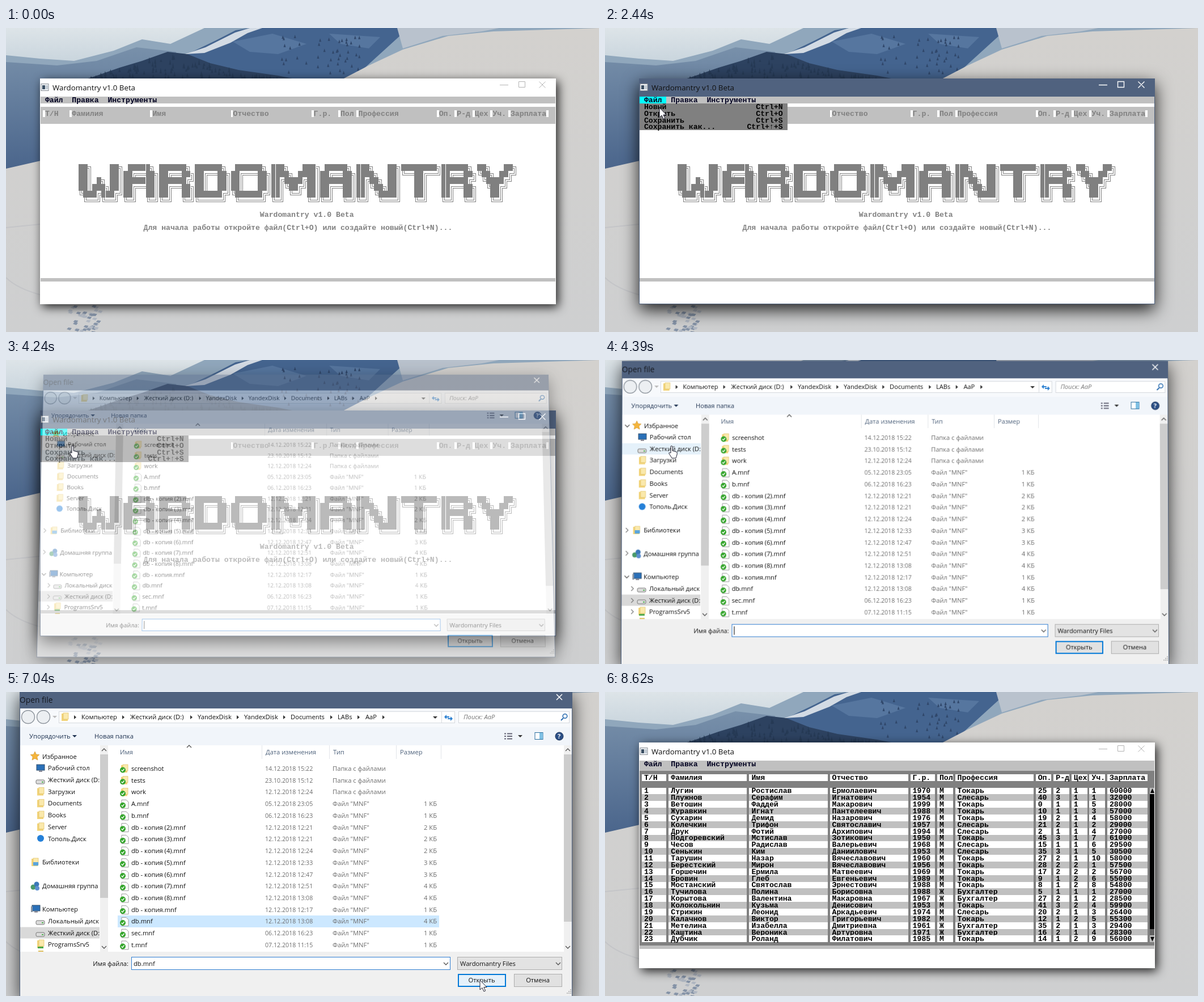
An HTML page for the animation above (9 s loop, 1046 by 536 pixels).

```html
<!DOCTYPE html>
<html lang="ru">
<head>
<meta charset="utf-8">
<title>Wardomantry</title>
<style>
html,body{margin:0;width:100%;height:100%;overflow:hidden;background:#cfcfce}
#stage{position:relative;width:100%;height:100%;overflow:hidden;contain:paint}
svg{position:absolute;left:0;top:0;overflow:hidden}
.con{font:bold 13.16px "Liberation Mono",monospace;fill:#000}
.cap{font:13.3px "Open Sans",sans-serif}
#frame{fill:#fff;filter:drop-shadow(4px 5px 9px rgba(0,0,0,.85))}
#bar{fill:#fff}
#ctl{stroke:#b4b4b4;fill:none}
.on #frame{fill:#50627f;filter:drop-shadow(0 10px 15px rgba(0,0,0,.85))}
.on #bar{fill:#50627f}
.on #ctl{stroke:#fff;stroke-width:1.4}
#dlg{position:absolute;left:24px;top:-2px;width:975px;height:541px;background:#50627f;
 box-shadow:0 8px 30px rgba(0,0,0,.75);transform-origin:487px 312px}
#dlg svg{left:-24px;top:2px;font:11.2px "Open Sans",sans-serif}
#mouse{position:absolute;left:0;top:0}
#mouse svg{left:-4px;top:-2px}
</style>
</head>
<body>
<div id="stage">
<svg id="base" width="1046" height="536"></svg>
<div id="dlg"><svg id="pane" width="1046" height="540"></svg></div>
<div id="mouse"><svg width="24" height="28" viewBox="-4 -2 24 28">
 <path id="arrow" d="M0 0V17L4 13.5 7 20 9.7 18.8 6.8 12.5H12Z" fill="#fff" stroke="#223"/>
 <path id="hand" d="M2 1Q4-1 5 2V9L12 11Q14 12 13 16L11 22H4L-1 14Q-2 11 2 13Z" fill="#fff" stroke="#223"/>
</svg></div>
</div>
<script>
const NAME = 'Wardomantry', LOOP = 9000;
const $ = id => document.getElementById(id);
const rect = (x, y, w, h, fill, more = '') =>
  `<rect x="${x}" y="${y}" width="${w}" height="${h}" fill="${fill}" ${more}/>`;
const path = (d, fill, more = '') => `<path d="${d}" fill="${fill}" ${more}/>`;
const line = (d, c, w = 1) => path(d, 'none', `stroke="${c}" stroke-width="${w}"`);
const disc = (x, y, r, fill, more = '') => `<circle cx="${x}" cy="${y}" r="${r}" fill="${fill}" ${more}/>`;
const text = (x, y, s, fill = '#111', more = '') => `<text x="${x}" y="${y + 4}" fill="${fill}" ${more}>${s}</text>`;
const group = (id, s) => `<g id="${id}">${s}</g>`;
const fadeDown = (id, a, b) =>
  `<linearGradient id="${id}" x2="0" y2="1"><stop stop-color="${a}"/><stop offset="1" stop-color="${b}"/></linearGradient>`;

// ---- snowy landscape ----
function photo() {
  let seed = 7;
  const rnd = () => (seed = seed * 16807 % 2147483647) / 2147483647;
  let s = `<defs>${fadeDown('sky', '#dde4e8', '#b8c8d4')}${fadeDown('snow', '#d3d1ce', '#cecfd0')}${fadeDown('hill', '#7890aa', '#48638a')}</defs>`;
  s += rect(0, 0, 1046, 110, 'url(#sky)');
  s += path('M0 48L60 54 120 58 190 40 240 20 290 28 350 0H1046V260H0Z', '#90a7bc');
  s += path('M0 60L90 66 160 58 230 34 300 42 340 260H0Z', 'url(#hill)');
  s += path('M320 46L370 22 405 4 430 0H710L600 100H290Z', '#44648f');
  s += path('M400 24L470 10 530 28 480 46 430 42ZM570 10L660 16 640 36 590 28Z', '#56769f');
  s += path('M110 100L160 84 200 70 240 58 285 42 320 46 360 62 410 74 480 84 560 100Z', '#2d4260');
  s += path('M316 46L352 34 380 20 404 8 430 0H452L426 9 396 26 350 44Z', '#d3dbe4');
  for (let i = 0; i < 110; i++) {
    const x = 150 + rnd() * 330, y = 92 - Math.max(0, 42 - Math.abs(x - 295) * .28) * rnd(), h = 4 + rnd() * 7;
    s += path(`M${x} ${y - h}l2 ${h}h-4Z`, '#263a55');
  }
  for (let i = 0; i < 45; i++) {
    const x = 480 + rnd() * 150, y = 16 + rnd() * 68;
    s += path(`M${x} ${y - 6}l2 6h-4Z`, '#30476a');
  }
  s += path('M0 248L70 232 300 150 590 92 640 66 700 38 780 14 860 6 1046 0V536H0Z', 'url(#snow)');
  s += path('M690 0H870L840 6 770 14 700 36Z', '#b9c2cd');
  s += line('M0 352L60 346M0 440Q40 480 180 486', '#c4c5c8', 2);
  for (let i = 0; i < 40; i++)
    s += path(`M${110 + rnd() * 55} ${488 + rnd() * 48}l6 1 -3 4 -6-2Z`, i % 2 ? '#8492a6' : '#b0b7c2');
  return s;
}

// ---- console window ----
const CW = 7.895, CH = 11.86;
const cx = c => 61 + c * CW, cy = r => 121.1 + r * CH;
const cells = (c, r, w, h, fill) => rect(cx(c), cy(r), w * CW, h * CH, fill, 'shape-rendering="crispEdges"');
const put = (c, r, s, fill = '#000') => `<text x="${cx(c)}" y="${cy(r) + 9.9}" style="fill:${fill}">${s}</text>`;
const EDGES = [0, 6, 24, 42, 60, 66, 70, 88, 92, 96, 100, 104, 113.5];
const HEADS = 'Т/Н Фамилия Имя Отчество Г.р. Пол Профессия Оп. Р-д Цех Уч. Зарплата'.split(' ');
const STAFF = `Лугин Ростислав Ермолаевич 1970 М Токарь 25 2 1 1 60000
Плужнов Серафим Игнатович 1954 М Слесарь 40 3 1 1 32000
Ветошин Фаддей Макарович 1999 М Токарь 0 1 1 5 28000
Журавкин Игнат Пантелеевич 1988 М Токарь 10 1 1 3 57000
Сухарин Демид Назарович 1976 М Токарь 19 2 1 4 58000
Колечкин Трифон Святославич 1957 М Слесарь 21 2 1 2 29000
Друк Фотий Архипович 1994 М Слесарь 2 1 1 4 27000
Подгоревский Мстислав Зотикович 1950 М Токарь 45 3 1 7 61000
Чесов Радислав Валерьевич 1968 М Слесарь 15 1 1 6 29500
Сенькин Ким Даниилович 1953 М Слесарь 35 3 1 5 30500
Тарушин Назар Вячеславович 1960 М Токарь 27 2 1 10 58000
Берестский Мирон Вячеславович 1956 М Токарь 28 2 2 1 57500
Горшечин Ермила Матвеевич 1969 М Токарь 17 2 2 2 56700
Бровин Глеб Евгеньевич 1989 М Токарь 9 1 2 6 55000
Мостанский Святослав Эрнестович 1988 М Токарь 8 1 2 8 54800
Тучилова Полина Борисовна 1988 Ж Бухгалтер 5 1 1 1 27000
Корытова Валентина Макаровна 1967 Ж Бухгалтер 27 2 1 2 28500
Колокольнин Кузьма Денисович 1953 М Токарь 41 3 2 4 59900
Стрижин Леонид Аркадьевич 1974 М Слесарь 20 2 1 3 26400
Калачнов Виктор Григорьевич 1982 М Токарь 12 1 2 5 55300
Метелина Изабелла Дмитриевна 1961 Ж Бухгалтер 35 2 1 3 29400
Каштина Вероника Артуровна 1971 Ж Бухгалтер 16 2 1 4 28300
Дубчик Роланд Филатович 1985 М Токарь 14 1 2 9 56000`.split('\n').map((s, i) => [i + 1, ...s.split(' ')]);

const GLYPHS = {
  W: '██╗    ██╗/██║    ██║/██║ █╗ ██║/██║███╗██║/╚███╔███╔╝/ ╚══╝╚══╝',
  A: ' █████╗/██╔══██╗/███████║/██╔══██║/██║  ██║/╚═╝  ╚═╝',
  R: '██████╗/██╔══██╗/██████╔╝/██╔══██╗/██║  ██║/╚═╝  ╚═╝',
  D: '██████╗/██╔══██╗/██║  ██║/██║  ██║/██████╔╝/╚═════╝',
  O: ' ██████╗/██╔═══██╗/██║   ██║/██║   ██║/╚██████╔╝/ ╚═════╝',
  M: '███╗   ███╗/████╗ ████║/██╔████╔██║/██║╚██╔╝██║/██║ ╚═╝ ██║/╚═╝     ╚═╝',
  N: '███╗   ██╗/████╗  ██║/██╔██╗ ██║/██║╚██╗██║/██║ ╚████║/╚═╝  ╚═══╝',
  T: '████████╗/╚══██╔══╝/   ██║/   ██║/   ██║/   ╚═╝',
  Y: '██╗   ██╗/╚██╗ ██╔╝/ ╚████╔╝/  ╚██╔╝/   ██║/   ╚═╝'
};
const LINKS = {'═': 'lr', '║': 'ud', '╔': 'rd', '╗': 'ld', '╚': 'ur', '╝': 'ul'};
const ENDS = {l: [0, .5], r: [1, .5], u: [.5, 0], d: [.5, 1]};

function banner(col, row) {
  let solid = '', wire = '';
  const at = (c, r) => `${cx(c).toFixed(1)} ${cy(r).toFixed(1)}`;
  for (const ch of NAME.toUpperCase()) {
    const rows = GLYPHS[ch].split('/'), w = Math.max(...rows.map(s => s.length));
    rows.forEach((s, j) => [...s].forEach((g, i) => {
      const c = col + i, r = row + j;
      if (g === '█') solid += `M${at(c, r)}h${CW}v${CH}h-${CW}Z`;
      else if (LINKS[g]) {
        const [a, b] = [...LINKS[g]].map(k => at(c + ENDS[k][0], r + ENDS[k][1]));
        wire += `M${a}L${at(c + .5, r + .5)}L${b}`;
      }
    }));
    col += w;
  }
  return `<g shape-rendering="crispEdges">${line(wire, '#808080', 4)}${line(wire, '#fff', 2)}${path(solid, '#808080')}</g>`;
}

function home() {
  let s = cells(0, 0, 115, 1, '#c0c0c0') + cells(0, 1.5, 115, 2.5, '#c0c0c0') + cells(0, 27, 115, .5, '#c0c0c0');
  EDGES.forEach((e, i) => {
    s += cells(i < 12 ? e + .5 : 113, 2, .5, 1, '#fff');
    if (i < 12) s += put(e + 1, 2, HEADS[i], '#808080');
  });
  s += banner(8.5, 10) + put(49, 17, NAME + ' v1.0 Beta', '#808080');
  return s + put(23, 19, 'Для начала работы откройте файл(Ctrl+O) или создайте новый(Ctrl+N)...', '#808080');
}

function table() {
  let s = cells(0, 0, 115, 1.5, '#c0c0c0') + cells(0, 1.5, 115, 26, '#808080') + cells(0, 27.5, 115, .5, '#c0c0c0');
  const row = (vals, r, bg) => vals.forEach((v, i) => {
    s += cells(EDGES[i] + .5, r, EDGES[i + 1] - EDGES[i] - .5, 1, bg) + put(EDGES[i] + 1, r, v);
  });
  row(HEADS, 2, '#fff');
  STAFF.forEach((p, i) => row(p, 4 + i, i % 2 ? '#c0c0c0' : '#fff'));
  s += cells(114, 4, 1, 23, '#c0c0c0') + cells(114, 5, 1, 20, '#000') + cells(114, 25, 1, 1, '#606060');
  return s + path(`M962 ${cy(4.8)}h7l-3.5-8ZM962 ${cy(26.2)}h7l-3.5 8Z`, '#000');
}

function menu() {
  let s = cells(0, 0, 6, 1, '#0ff') + cells(0, 1, 33, 4, '#808080');
  [['Новый', 'Ctrl+N'], ['Открыть', 'Ctrl+O'], ['Сохранить', 'Ctrl+S'], ['Сохранить как...', 'Ctrl+↑+S']]
    .forEach(([a, b], i) => s += put(1, i + 1, a) + put(32 - b.length, i + 1, b));
  return s;
}

$('base').innerHTML = photo() +
  rect(60, 89, 910, 398, '#fff', 'id="frame"') + rect(61, 90, 908, 31.3, '#fff', 'id="bar"') +
  rect(61, 121, 908, 365, '#fff') +
  rect(62, 98.5, 13, 12, '#eef1f4', 'stroke="#8a8f96"') + rect(64, 101, 5, 7, '#3c5064') + rect(70, 101, 4, 7, '#c3ccd5') +
  text(82, 106, NAME + ' v1.0 Beta', '#111', 'class="cap"') +
  group('ctl', '<path d="M871 100.5H886M904.5 94.5h11v10h-11ZM940.5 94.5l11 11M951.5 94.5l-11 11"/>') +
  `<g class="con">${group('home', home())}${group('table', table())}${group('menu', menu())}` +
  put(1, 0, 'Файл', '#000020') + put(7, 0, 'Правка', '#000020') + put(15, 0, 'Инструменты', '#000020') + '</g>';

// ---- file dialog ----
const folder = (x, y) => rect(x - 6, y - 6, 11, 13, '#f2d47a') + rect(x - 3, y - 7, 9, 11, '#fae9ac', 'stroke="#dfbf62" stroke-width=".7"');
const sheet = (x, y) => path(`M${x - 5} ${y - 7}h8l4 4v11h-12Z`, '#fff', 'stroke="#9a9a9a"');
const tick = (x, y) => disc(x, y, 5, '#35a52c') + line(`M${x - 2.5} ${y}l2 2 3-4`, '#fff', 1.4);
const drive = (x, y) => rect(x - 8, y - 1, 15, 7, '#dcdcdc', 'rx="2" stroke="#777"') + rect(x + 2, y + 2, 3, 1.5, '#3a3');
const screen = (x, y) => rect(x - 7, y - 6, 14, 10, '#2a70b8', 'stroke="#35506c"') + rect(x - 3, y + 5, 6, 1.5, '#667');
const down = (x, y, c = '#333') => path(`M${x - 4} ${y - 2}h8l-4 4Z`, c);
const chev = (x, y) => line(`M${x - 4} ${y - 2}l4 4 4-4`, '#555', 1.3);
const up = (x, y) => line(`M${x - 4} ${y + 2}l4-4 4 4`, '#555', 1.3);
const right = (x, y) => line(`M${x - 2} ${y - 4}l4 4-4 4`, '#777', 1.2);
const rowY = i => 135 + 20.73 * i;

const FILES = [['screenshot', '14.12.2018 15:22'], ['tests', '23.10.2018 15:12'], ['work', '12.12.2018 12:24'],
  ['A.mnf', '05.12.2018 23:05', 1], ['b.mnf', '06.12.2018 16:23', 1],
  ...['12:21', '12:21', '12:24', '12:33', '12:47', '12:51', '13:08'].map((h, i) =>
    [`db - копия (${i + 2}).mnf`, '12.12.2018 ' + h, 2 + (i > 2) + (i > 4)]),
  ['db - копия.mnf', '12.12.2018 12:17', 1], ['db.mnf', '12.12.2018 13:08', 4],
  ['sec.mnf', '06.12.2018 16:23', 1], ['t.mnf', '07.12.2018 11:15', 1]];

function topBars() {
  let s = text(24, 14.5, 'Open file', '#15181f', 'style="font-size:13.8px"') + line('M971 4l10 10M981 4l-10 10', '#fff', 1.5);
  s += rect(25, 29, 973, 34, '#f7f9fc') + rect(25, 62, 973, 32, '#f1f5fa');
  for (const x of [39, 66]) s += disc(x, 44, 11.5, '#eceff2', 'stroke="#8c939b" stroke-width="1.4"');
  s += down(86, 44, '#bbb');
  s += rect(93.5, 34.5, 698, 20, '#fff', 'stroke="#d5d9de"') + line('M768.5 35V55', '#d5d9de') + folder(104, 44);
  [[133, 'Компьютер'], [219, 'Жесткий диск (D:)'], [338, 'YandexDisk'], [420, 'YandexDisk'], [502, 'Documents'], [585, 'LABs'], [634, 'AaP']]
    .forEach(([x, v]) => s += text(x, 44, v));
  for (const x of [122, 207, 327, 409, 491, 574, 622, 666]) s += path(`M${x - 2} 41l4 3.5-4 3.5Z`, '#333');
  s += down(757, 45) + path('M773 44l4-4v3h5v2h-5v3ZM788 47l-4 4v-3h-5v-2h5v-3Z', '#2a7fd0');
  s += rect(798.5, 34.5, 195, 20, '#fff', 'stroke="#d5d9de"') + text(807, 44, 'Поиск: AaP', '#777', 'font-style="italic"');
  s += disc(986, 42.5, 3.8, 'none', 'stroke="#2a6cb0" stroke-width="1.6"') + line('M983 46l-4 4', '#2a6cb0', 2);
  s += text(41, 78, 'Упорядочить', '#1e3250') + down(121, 78, '#1e3250') + text(156, 78, 'Новая папка', '#1e3250');
  s += line('M879 73.5h3M879 78h3M879 82.5h3M884 73.5h9M884 78h9M884 82.5h9', '#667', 1.8) + down(907, 78);
  s += rect(933, 71.5, 14, 12, '#fff', 'stroke="#2a6f9e"') + rect(941, 72, 6, 11, '#7fc0e4');
  return s + disc(976, 78, 7, '#2b4f86', 'stroke="#1b3158"') + text(973, 78, '?', '#fff', 'font-weight="bold"');
}

function sidebar() {
  let s = rect(25, 414.5, 141, 20, '#d9d9d9') + rect(25, 145, 141, 20, '#e5f1fa', 'id="sideHot"');
  s += path('M51 105l2.3 5 5.5.6-4 3.8 1.2 5.6-5-2.8-5 2.8 1.2-5.6-4-3.8 5.5-.6Z', '#f5b53c', 'stroke="#c98a1c" stroke-width=".6"');
  s += text(64, 114, 'Избранное') + screen(61, 134) + drive(61, 156);
  ['Рабочий стол', 'Жесткий диск (D:)', 'Загрузки', 'Documents', 'Books', 'Server', 'Тополь.Диск'].forEach((v, i) => {
    s += text(74, 134 + 20.75 * i, v);
    if (i > 1 && i < 6) s += folder(61, 134 + 20.75 * i);
  });
  s += disc(61, 258, 6, '#2580d8') + folder(51, 300) + rect(48, 300, 9, 6, '#5aa5dc') + text(64, 300, 'Библиотеки');
  s += disc(48, 344, 4.5, '#4a9a6a') + disc(54, 339, 4.5, '#3b78b8') + disc(55, 346, 4, '#5c8fd0') + text(64, 342, 'Домашняя группа');
  s += screen(53, 382) + rect(44, 378, 3, 10, '#8a96a4') + text(64, 383, 'Компьютер');
  s += drive(61, 404) + text(74, 404, 'Локальный диск (C:)') + drive(61, 425) + text(74, 425, 'Жесткий диск (D:)');
  s += folder(61, 444) + rect(56, 449, 10, 3, '#4aa84a') + text(74, 445, 'ProgramsSrv5') + rect(57, 456, 9, 2, '#e0c060');
  const arrows = [114, 383].map(y => chev(34, y)).join('') + right(34, 300) + right(34, 341) + [404, 425, 445].map(y => right(44, y)).join('');
  return `<clipPath id="side"><rect x="24" y="94" width="141" height="364"/></clipPath><g clip-path="url(#side)">${s}${group('arrows', arrows)}</g>` +
    rect(166, 94, 14, 364, '#f0f0f0') + rect(166, 110, 14, 253, '#cdcdcd') + up(173, 102) + chev(173, 450);
}

function files() {
  let s = '';
  [[201, 'Имя'], [458, 'Дата изменения'], [577, 'Тип'], [695, 'Размер']].forEach(([x, v]) => s += text(x, 106, v, '#4c607a'));
  for (const x of [451.5, 570.5, 688.5, 767.5]) s += line(`M${x} 94V118`, '#e2e5e9');
  s += up(323, 96) + rect(197, rowY(13) - 10.5, 567, 21, '#e5f3ff', 'id="pick"');
  FILES.forEach(([n, d, kb], i) => {
    const y = rowY(i);
    s += (kb ? sheet : folder)(209, y) + tick(206, y + 2.5) + text(221, y, n) + text(457, y, d, '#6d6d6d', 'style="font-size:10.65px"');
    s += text(576, y, kb ? 'Файл "MNF"' : 'Папка с файлами', '#6d6d6d');
    if (kb) s += text(760, y, kb + ' КБ', '#6d6d6d', 'text-anchor="end"');
  });
  return s + rect(984, 94, 14, 364, '#f0f0f0') + rect(984, 110, 14, 295, '#cdcdcd') + up(991, 102) + chev(991, 450);
}

function footer() {
  let s = rect(25, 458, 973, 80, '#f0f0f0') + text(216, 479, 'Имя файла:', '#111', 'text-anchor="end"');
  s += rect(221.5, 467.5, 562, 22, '#fff', 'stroke="#2f7dd1"') + chev(776, 479);
  s += rect(225, 471, 40, 15, '#3399ff', 'id="mark"') + text(225, 479, 'db.mnf', '#111', 'id="entry"') + rect(225, 471, 1, 15, '#000', 'id="caret"');
  s += rect(796.5, 467.5, 184, 22, '#e3e3e3', 'stroke="#adadad"') + text(801, 479, NAME + ' Files') + chev(974, 479);
  s += rect(798, 498, 83, 21, '#e1e1e1', 'id="ok" stroke="#0078d7" stroke-width="2"') + text(839, 508, 'Открыть', '#111', 'text-anchor="middle"');
  s += rect(896.5, 497.5, 84, 22, '#e1e1e1', 'stroke="#adadad"') + text(938, 508, 'Отмена', '#111', 'text-anchor="middle"');
  for (let i = 0; i < 3; i++)
    for (let j = 0; j < 3 - i; j++) s += rect(995 - 3 * j, 530 - 3 * i, 2, 2, '#bbb');
  return s;
}
$('pane').innerHTML = topBars() + rect(25, 94, 973, 364, '#fff') + sidebar() + files() + footer();

// ---- motion ----
const TRACK = [[120, 915, 530], [970, 91, 117], [1270, 91, 117], [1430, 92, 109], [1510, 92, 109], [1660, 93, 123],
  [2050, 93, 123], [2130, 94, 137], [2280, 94, 137], [2680, 100, 147], [2830, 100, 147], [2910, 103, 144], [3060, 104, 144],
  [3290, 109, 141], [3460, 110, 141], [3760, 114, 151], [5010, 114, 151], [5640, 248, 400], [5870, 248, 400],
  [5950, 248, 403], [6230, 248, 403], [7040, 836, 508], [LOOP, 836, 508]];

function pointer(t) {
  const i = Math.max(1, TRACK.findIndex(k => k[0] > t));
  const [t0, x0, y0] = TRACK[i - 1], [t1, x1, y1] = TRACK[i];
  const u = Math.min(1, Math.max(0, (t - t0) / (t1 - t0))), e = u * u * (3 - 2 * u);
  return [x0 + (x1 - x0) * e, y0 + (y1 - y0) * e];
}
const show = (id, on) => $(id).style.visibility = on ? 'inherit' : 'hidden';
const unit = v => Math.min(1, Math.max(0, v));

function draw(t) {
  const [x, y] = pointer(t), open = t >= 4080 && t < 7680;
  const loaded = t >= 8150, chosen = t >= 6190, pressed = t >= 7150;
  $('base').classList.toggle('on', t >= 1510 && t < 8620);
  show('menu', t >= 2050 && t < 8070);
  show('home', !loaded);
  show('table', loaded);

  const rise = unit((t - 4150) / 400), fade = unit((t - 7470) / 180), rest = (1 - rise) ** 3;
  const dlg = $('dlg');
  show('dlg', open);
  dlg.style.opacity = unit(rise * 2) * (1 - fade);
  dlg.style.transform = rest || fade
    ? `perspective(1500px) rotateX(${10 * rest + 10.4 * fade}deg) scale(${1 - .156 * rest - .072 * fade})` : 'none';

  const inSide = open && x < 166 && t < 5300;
  show('sideHot', inSide && y < 166);
  show('arrows', inSide);
  show('pick', chosen || (t > 5200 && Math.abs(y - rowY(13)) < 10.5));
  $('pick').setAttribute('fill', pressed ? '#d9d9d9' : chosen ? '#cce8ff' : '#e5f3ff');
  show('entry', chosen);
  show('mark', pressed);
  $('entry').setAttribute('fill', pressed ? '#fff' : '#111');
  show('caret', t < 6000 && Math.floor((t - 4000) / 530) % 2 === 0);
  $('ok').setAttribute('fill', pressed ? '#cce4f7' : x > 797 && y > 497 ? '#e5f1fb' : '#e1e1e1');

  show('mouse', t >= 120 && t < 8620);
  show('arrow', !inSide);
  show('hand', inSide);
  $('mouse').style.transform = `translate(${x}px,${y}px)`;
}
function frame() {
  draw(performance.now() % LOOP);
  requestAnimationFrame(frame);
}
frame();
</script>
</body>
</html>
```
